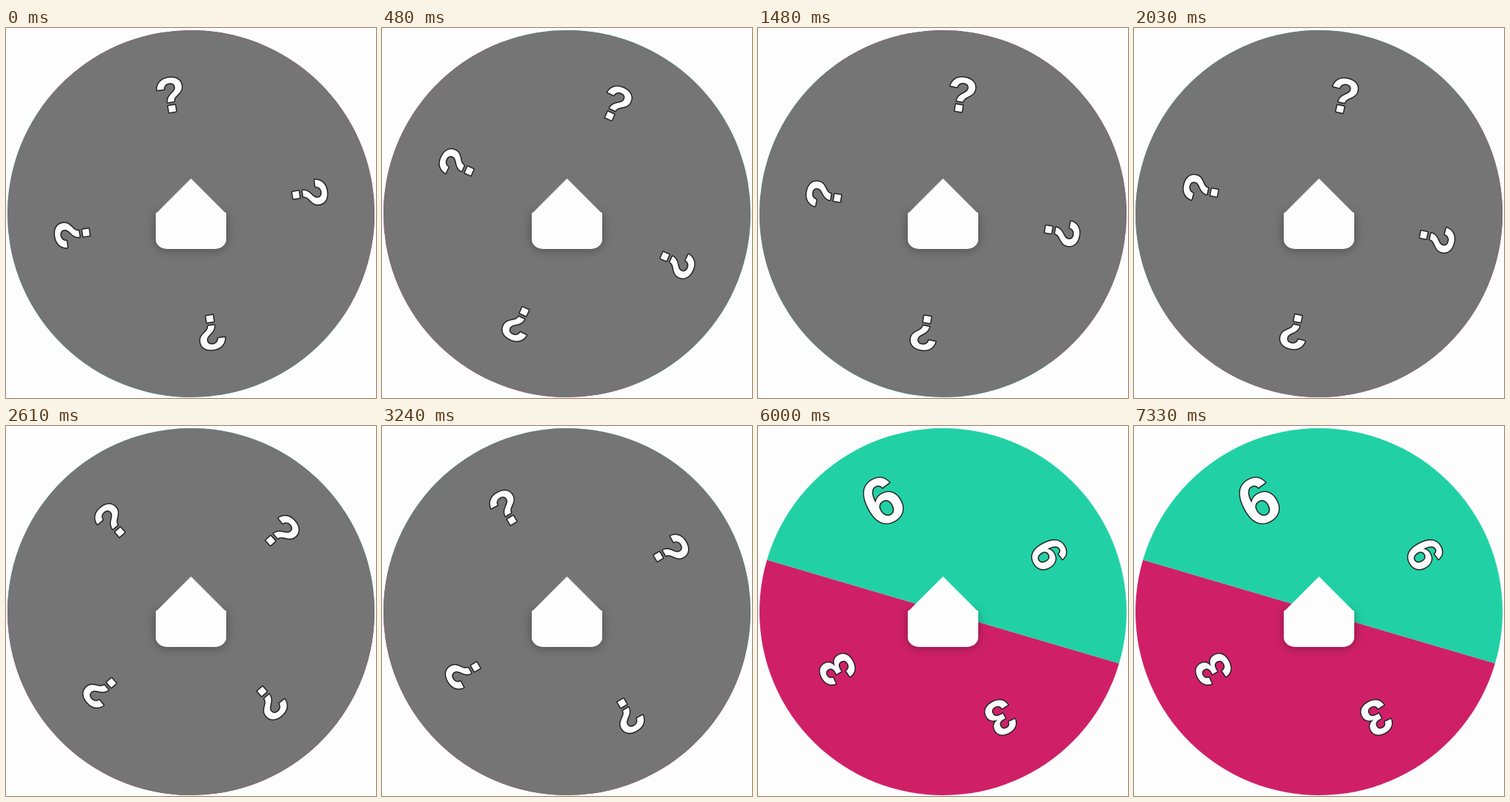
Animation, 504 px wide and 504 px high, one loop 7.36 s. Source, as an HTML page with a canvas:

```html
<!DOCTYPE html>
<html lang="en">
<head>
<meta charset="utf-8">
<title>Prize wheel</title>
<style>
  html, body { margin: 0; width: 100%; height: 100%; overflow: hidden; background: #fdfdfd; }
  canvas { display: block; }
</style>
</head>
<body>
<canvas width="504" height="504"></canvas>
<script>
const ctx = document.querySelector('canvas').getContext('2d');
const LOOP = 7360, CX = 252, CY = 253, R = 250;
const WHITE = '#fdfdfd', GREY = '#757575', GREEN = '#21d1a5', PINK = '#cf2067';
const LABELS = ['6', '6', '3', '3'];
const SIZE = 67, WINNER_SIZE = 90, BASELINE = 141;
const REST = -28.6, TURN = 1241, SPIN = 4885, POWER = 6;
const REVEAL = 5240, FADE = 450, STEP = 30.42;
const rad = deg => deg * Math.PI / 180;
const clamp = x => Math.max(0, Math.min(1, x));

// The picture advances in steps of about 30 ms, rounded to 10 ms.
function snap(t) {
  if (t < 60) return 0;
  const k = Math.ceil((Math.floor(t / 10) * 10 - 50) / STEP) - 1;
  return Math.floor((60 + STEP * k) / 10) * 10;
}

function disc(color, from = 0, to = 2 * Math.PI) {
  ctx.fillStyle = color;
  ctx.beginPath();
  ctx.arc(0, 0, R, from, to);
  ctx.fill();
}

function label(text, sector, size, alpha) {
  if (!alpha) return;
  ctx.save();
  ctx.globalAlpha = alpha;
  ctx.rotate(rad(sector * 90));
  ctx.font = `bold ${size}px "Liberation Sans", Arial, sans-serif`;
  ctx.strokeText(text, 0, -BASELINE);
  ctx.fillText(text, 0, -BASELINE);
  ctx.restore();
}

function wheel(angle, shown) {
  ctx.save();
  ctx.translate(CX, CY);
  ctx.rotate(rad(angle));
  disc(GREEN, rad(-135), rad(45));
  disc(PINK, rad(45), rad(225));
  ctx.globalAlpha = 1 - shown;
  disc(GREY);
  ctx.textAlign = 'center';
  ctx.lineJoin = 'round';
  ctx.lineWidth = 3;
  ctx.strokeStyle = '#222';
  ctx.fillStyle = WHITE;
  LABELS.forEach((text, i) => {
    label('?', i, SIZE, 1 - shown);
    label(text, i, i ? SIZE : SIZE + (WINNER_SIZE - SIZE) * shown, shown);
  });
  ctx.restore();
}

function pointer() {
  ctx.save();
  ctx.fillStyle = WHITE;
  ctx.shadowColor = 'rgba(0,0,0,.35)';
  ctx.shadowBlur = 14;
  ctx.shadowOffsetY = 1;
  ctx.beginPath();
  const corner = { x: 16, y: 13 };
  ctx.roundRect(204, 251, 96, 50, [2, 2, corner, corner]);
  ctx.fill();
  ctx.shadowColor = 'transparent';
  ctx.beginPath();
  ctx.moveTo(252, 205);
  ctx.lineTo(300, 253);
  ctx.lineTo(204, 253);
  ctx.fill();
  ctx.restore();
}

function draw(now) {
  const t = snap(now % LOOP);
  const left = TURN * clamp(1 - t / SPIN) ** POWER;
  ctx.fillStyle = WHITE;
  ctx.fillRect(0, 0, 504, 504);
  wheel(REST - left, clamp((t - REVEAL) / FADE));
  pointer();
  requestAnimationFrame(draw);
}
requestAnimationFrame(draw);
</script>
</body>
</html>
```
